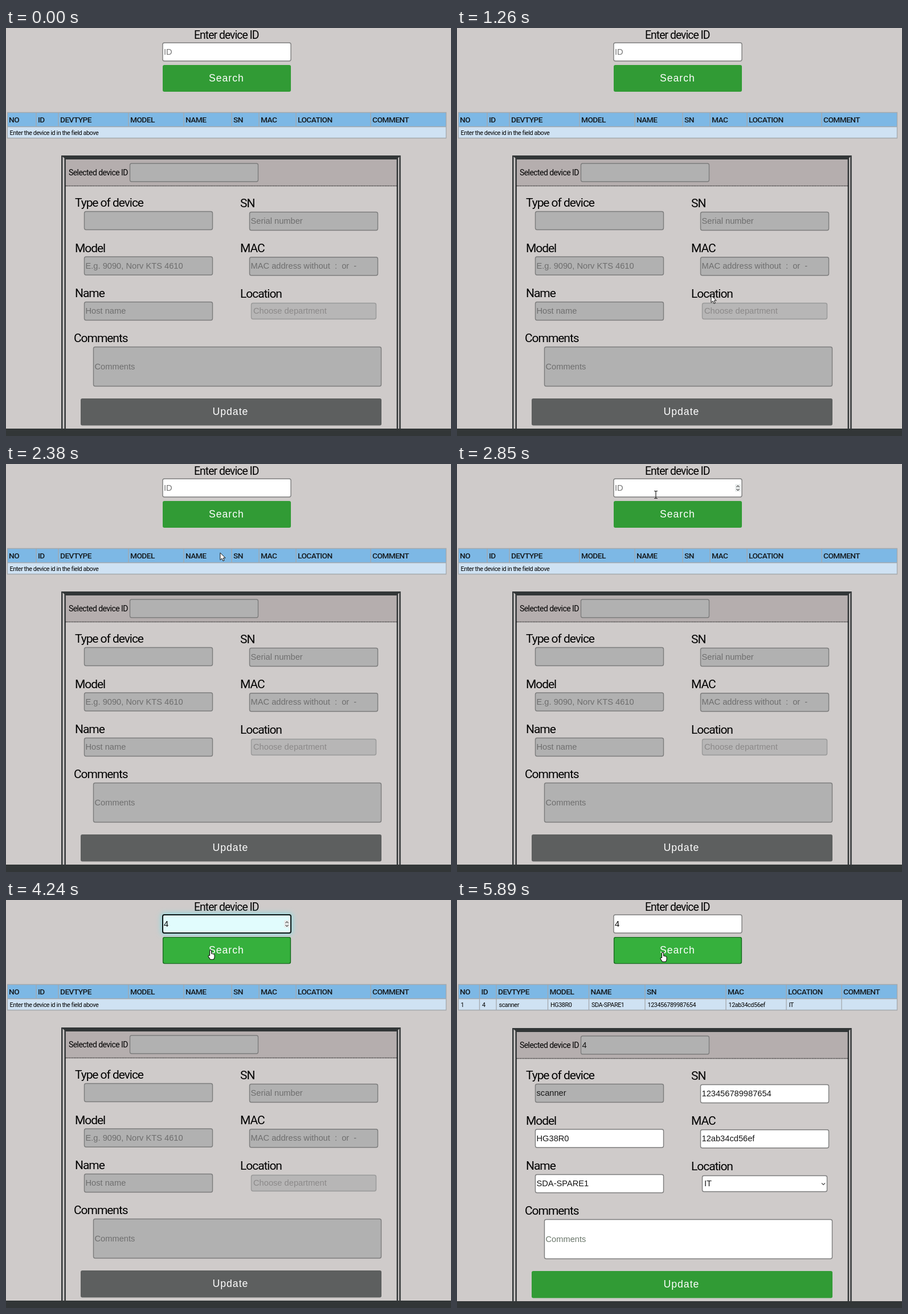
An HTML page for the animation above (5.92 s loop, 781 px wide and 717 px high).

```html
<!DOCTYPE html>
<html lang="en">
<head>
<meta charset="utf-8">
<title>Device search</title>
<style>
  html, body { margin: 0; width: 100%; height: 100%; overflow: hidden; background: #cfcbca; }
  svg { display: block; width: 100%; height: 100%; }
  text { font: 14.667px "Liberation Sans", Arial, sans-serif; white-space: pre; }
  .label, .small, .head, .cell { font-family: Roboto, sans-serif; letter-spacing: -.04em; }
  .label { font-size: 21px; letter-spacing: -.05em; }
  .title { font-size: 19.4px; }
  .small { font-size: 14px; }
  .head { font-size: 13.7px; font-weight: 500; fill: #151a1e; }
  .cell { font-size: 10.8px; }
  .btn { font-size: 17.6px; letter-spacing: 1px; fill: #fff; }
</style>
</head>
<body>
<svg id="stage" viewBox="0 0 781 717"></svg>
<script>
const LOOP = 5920, FOUND = 4480;
const GREEN = '#319b35', DARK = '#323637', LINE = '#a5a9ad';

const text = (x, y, s, cls = '', fill = '#000') =>
  `<text x="${x}" y="${y}" class="${cls}" fill="${fill}">${s}</text>`;
const rect = (x, y, w, h, fill, more = '') =>
  `<rect x="${x}" y="${y}" width="${w}" height="${h}" fill="${fill}" ${more}/>`;
const box = (x, y, w, h, fill, stroke = '#7c7c7c') =>
  rect(x, y, w, h, fill, `rx="3" stroke="${stroke}" stroke-width="1.4"`);
const path = (d, fill, more = '') => `<path d="${d}" fill="${fill}" ${more}/>`;
const group = (id, body) => `<g id="${id}">${body}</g>`;

// x, y, width, height, placeholder, value, stays locked
const fields = [
  [217.5, 238, 225, 32, '', '4', true],
  [137.5, 322.5, 225, 32, '', 'scanner', true],
  [427.5, 323.5, 225, 32, 'Serial number', '123456789987654'],
  [137.5, 402, 225, 32, 'E.g. 9090, Norv KTS 4610', 'HG38R0'],
  [427.5, 402.7, 225, 32, 'MAC address without  :  or  -', '12ab34cd56ef'],
  [137.5, 481.5, 225, 32, 'Host name', 'SDA-SPARE1'],
  [430.5, 483.5, 219, 28, 'Choose department', 'IT'],
  [153.5, 560.5, 505, 69, 'Comments', '']
];
const update = [131, 651, 528, 47.5];

function field([x, y, w, h, hint, value, locked], found) {
  const select = h === 28, tx = x + (select ? 3.5 : 2), ty = Math.floor(y + h / 2 + 5);
  if (!found)
    return box(x, y, w, h, select ? '#b7b6b6' : '#b1b1b1', select ? '#999' : '#7c7c7c') +
      text(tx, ty, hint, '', select ? '#8b8989' : '#6e6e6e');
  return box(x, y, w, h, locked ? '#b1b1b1' : '#fff') +
    text(tx, ty, value || hint, '', value ? '#161616' : '#6a766a') +
    (select ? path('M640 496.5l3 3 3-3', 'none', 'stroke="#444" stroke-width="1.1"') : '');
}

const columns = 'NO ID DEVTYPE MODEL NAME SN MAC LOCATION COMMENT'.split(' ');

function table(id, edges, cells) {
  const row = cells.length > 1;
  const lines = edges.slice(1).map(x => `M${x} 149V${row ? 194 : 174}`).join('');
  return group(id,
    rect(2, 148, 771, 26, '#7db8e5') + rect(2, 174, 771, 20, '#cfe2f3', 'class="row"') +
    path(lines + 'M2.5 148.5H772.5V193.5H2.5ZM2 173.5H773', 'none', `stroke="${LINE}" stroke-width="1.3"`) +
    columns.map((s, i) => text(edges[i] + 3, 166, s, 'head')).join('') +
    cells.map((s, i) => text(edges[i] + 4.5, 187.5, s, 'cell')).join(''));
}

const panel =
  rect(105, 231, 581, 47, '#b5aeae') +
  path('M105 277.5H686', 'none', 'stroke="#222" stroke-width="1.4" stroke-dasharray="1.4 1.4"') +
  path('M97 224H692.6L685.6 231H105Z', DARK) +
  [[97, 224], [102.4, 229], [685.6, 229], [690.2, 224]].map(([x, y]) => rect(x, y, 2.5, 705 - y, DARK)).join('') +
  rect(0, 704, 781, 14, DARK) +
  text(110, 259, 'Selected device ID', 'small') +
  [[121, 314, 'Type of device'], [411, 315, 'SN'], [121, 394, 'Model'], [411, 394, 'MAC'],
   [121, 473, 'Name'], [411, 474, 'Location'], [119, 552, 'Comments']]
    .map(([x, y, s]) => text(x, y, s, 'label')).join('');

const form = (id, found) => group(id,
  fields.map(f => field(f, found)).join('') +
  rect(...update, found ? GREEN : '#5d5f5f', 'rx="3"') +
  text(362.6, 680, 'Update', 'btn'));

const chevrons = path('M490.5 40.5l2.5-2.5 2.5 2.5M490.5 44l2.5 2.5 2.5-2.5', 'none', 'stroke="#555" stroke-width="1.2"');

const pointers = {
  arrow: path('M0 0V12.5L3 9.8L5 14.3L7.2 13.3L5.2 9H9.2Z', '#fff', 'stroke="#111" stroke-width="1"'),
  beam: path('M-3 -6.5H-1L0 -5.5L1 -6.5H3M0 -5.5V5.5M-3 6.5H-1L0 5.5L1 6.5H3', 'none', 'stroke="#222" stroke-width="1.2"'),
  hand: path('M-1.5 9.5V1.5a1.5 1.5 0 0 1 3 0V6l4 1q1.5.5 1.5 2V13l-1.5 3.5H-.5L-3.8 11.5q-.6-2 1-2z', '#fff', 'stroke="#111" stroke-width="1.1"'),
  deny: '<circle r="5" fill="#fff" stroke="#c8141c" stroke-width="1.9"/>' +
    path('M-3.5 -3.5L3.5 3.5', 'none', 'stroke="#c8141c" stroke-width="1.9"')
};

stage.innerHTML =
  '<filter id="blur" x="-20%" y="-100%" width="140%" height="300%"><feGaussianBlur stdDeviation="5"/></filter>' +
  text(330, 18.5, 'Enter device ID', 'label title') +
  group('glow', rect(272, 23, 231, 38, '#7fdfe6', 'rx="5" filter="url(#blur)" opacity=".75"')) +
  box(275, 26, 225, 32, '#fff') +
  group('tint', rect(275, 26, 225, 32, '#e1fcfd', 'rx="3"')) +
  group('ring', rect(275, 26, 225, 32, 'none', 'rx="3" stroke="#0b1414" stroke-width="2"')) +
  group('hint', text(277, 47, 'ID', '', '#757575')) +
  group('typed', text(277, 47, '4')) +
  group('spin', rect(488, 35.5, 10, 13, '#e8ecec', 'rx="1"') + chevrons) +
  rect(275, 65, 225, 47, GREEN, 'rx="3"') +
  group('hover', box(275.6, 65.6, 223.8, 46, '#36b03d', '#1c6a22')) +
  text(356, 94, 'Search', 'btn') +
  table('empty', [2, 53, 92, 215, 312, 396, 444, 509, 640], ['Enter the device id in the field above']) +
  table('result', [2, 39.5, 69, 159.5, 231.5, 330, 472, 578, 675],
    ['1', '4', 'scanner', 'HG38R0', 'SDA-SPARE1', '123456789987654', '12ab34cd56ef', 'IT']) +
  group('lower', panel + form('locked', false) + form('open', true)) +
  group('pointer', Object.entries(pointers).map(([k, s]) => group(k, s)).join(''));

const el = id => document.getElementById(id);
const show = (id, on) => { el(id).style.display = on ? '' : 'none'; };
const clamp = v => Math.min(1, Math.max(0, v));
const inside = (x, y, [l, t, w, h]) => x >= l && x <= l + w && y >= t && y <= t + h;

// time, x, y of the pointer's hot spot
const route = [
  [300, 506, 713], [560, 490, 669], [790, 482, 638], [880, 473, 613], [910, 470, 602],
  [1100, 451, 510], [1260, 446, 470], [1560, 446, 469], [1720, 438, 425], [1900, 424, 340],
  [2050, 409, 264], [2130, 397, 228], [2160, 395, 222], [2300, 384, 182], [2500, 364, 118],
  [2640, 354, 78], [2740, 349, 58], [2780, 349, 56], [2850, 349, 54], [3850, 349, 55],
  [4000, 352, 70], [4150, 357, 84], [4240, 359, 88], [5889, 359, 88], [5890, 361, 92]
];

function place(t) {
  const i = route.findIndex(p => p[0] > t);
  if (i < 0) return route[route.length - 1].slice(1);
  const [t0, x0, y0] = route[i - 1], [t1, x1, y1] = route[i];
  const k = (t - t0) / (t1 - t0);
  return [x0 + (x1 - x0) * k, y0 + (y1 - y0) * k];
}

function draw(t) {
  const found = t >= FOUND, visible = t >= 300;
  const [x, y] = visible ? place(t) : [-50, -50];
  const onButton = inside(x, y, [275, 65, 225, 47]);
  const denied = !found && [...fields, update].some(f => inside(x, y, f));
  const kind = onButton ? 'hand' : inside(x, y, [275, 26, 225, 33]) ? 'beam' : denied ? 'deny' : 'arrow';

  show('pointer', visible);
  el('pointer').setAttribute('transform', `translate(${x} ${y})`);
  for (const k in pointers) show(k, k === kind);

  show('hover', onButton);
  document.querySelector('#empty .row').setAttribute('fill', inside(x, y, [2, 174, 771, 20]) ? '#bfdcf1' : '#cfe2f3');

  const focus = clamp((t - 3070) / 160) * clamp((4540 - t) / 130);
  el('glow').style.opacity = el('tint').style.opacity = focus;
  show('ring', t >= 3100 && t < 4410);
  show('spin', t >= 2780 && t < FOUND);
  show('hint', t < 3490);
  show('typed', t >= 3490);

  for (const id of ['empty', 'locked']) show(id, !found);
  for (const id of ['result', 'open']) show(id, found);
  el('lower').setAttribute('transform', `translate(0 ${found ? 1 : 0})`);
}

const start = performance.now();
function tick() {
  draw((performance.now() - start) % LOOP);
  requestAnimationFrame(tick);
}
tick();
</script>
</body>
</html>
```
